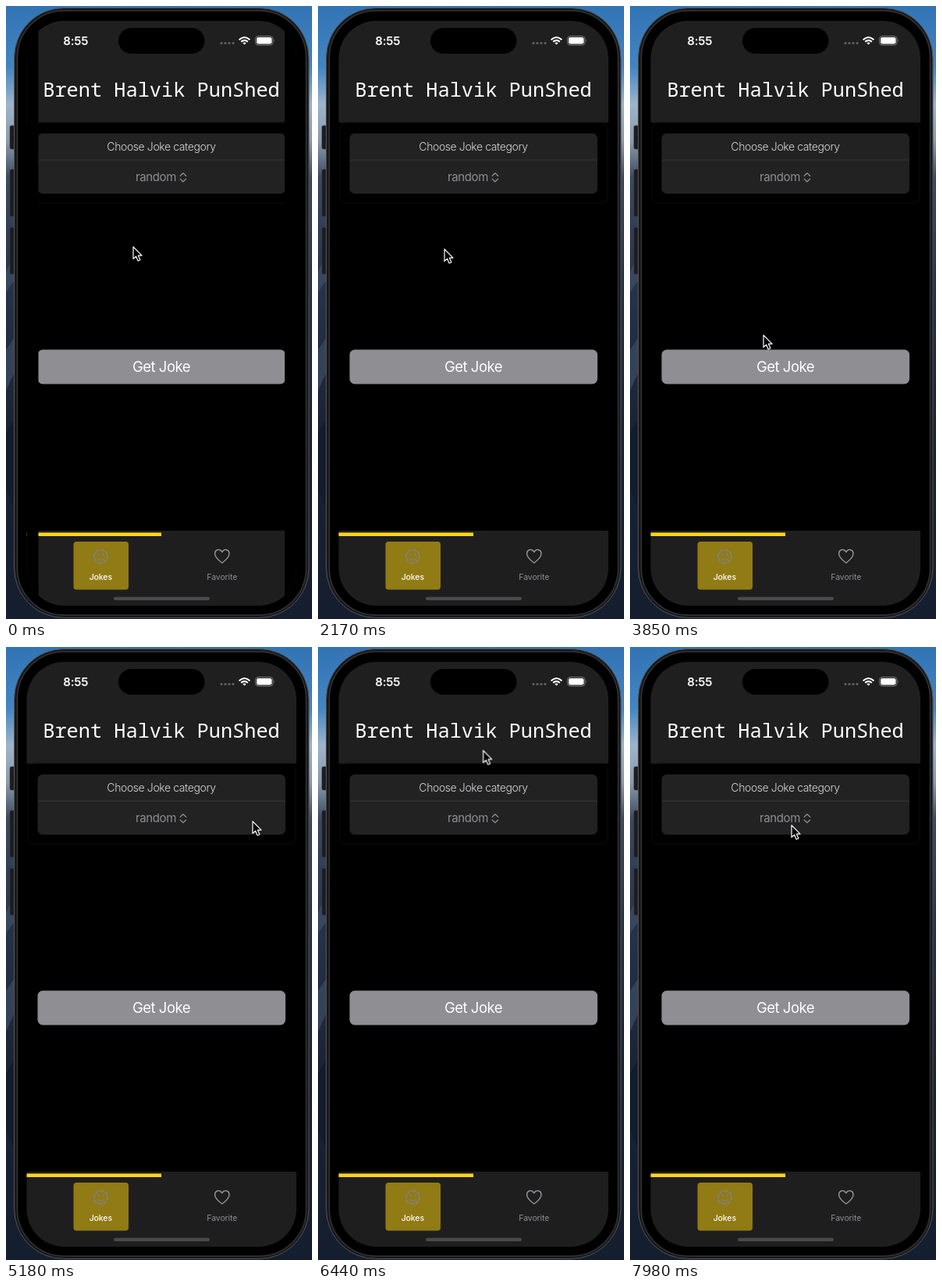
Recreate the animation shown at these times as an HTML page. Size 392 by 784 pixels, loop 8 s.

```html
<!DOCTYPE html>
<html lang="en">
<head>
<meta charset="utf-8">
<title>Joke screen</title>
<style>
  html, body { margin: 0; width: 100%; height: 100%; overflow: hidden; background: #000; }
  svg { display: block; width: 392px; height: 784px; }
  text { font-family: Inter, "Open Sans", sans-serif; text-anchor: middle; }
  .title { font: 500 25.3px "Noto Sans Mono", monospace; fill: #fff; }
  .clock { font-size: 15px; font-weight: 600; letter-spacing: -.2px; fill: #fff; }
  .label { font-size: 14px; font-weight: 300; letter-spacing: -.4px; fill: #d8d8da; }
  .choice { font-size: 15px; letter-spacing: -.4px; fill: #8e8e93; }
  .action { font-size: 18.5px; letter-spacing: -.5px; fill: #fff; }
  .tab { font-size: 10.5px; letter-spacing: -.1px; fill: #8e8e93; }
  .tab.on { font-weight: 500; fill: #fff; }
  .line { fill: none; stroke-linecap: round; stroke-linejoin: round; }

  .margins { animation: margins 8s step-end infinite; }
  @keyframes margins {
    0% { visibility: visible; }
    .875%, 100% { visibility: hidden; }
  }

  /* The pointer advances every 70 ms while it moves. */
  .pointer { animation: roam 8s step-end infinite; }
  @keyframes roam {
    0% { transform: translate(163px, 308px); }
    27.125% { transform: translate(162px, 311px); animation-timing-function: steps(8); }
    34.125% { transform: translate(166px, 366px); }
    36.75% { transform: translate(166px, 370px); animation-timing-function: steps(6); }
    42% { transform: translate(170px, 412px); }
    44.625% { transform: translate(170px, 413px); animation-timing-function: steps(4); }
    48.125% { transform: translate(171px, 421px); animation-timing-function: steps(7); }
    54.25% { transform: translate(180px, 430px); }
    55.125% { transform: translate(182px, 429px); animation-timing-function: steps(3); }
    57.75% { transform: translate(190px, 420px); }
    61.25% { transform: translate(205px, 402px); animation-timing-function: steps(4); }
    64.75% { transform: translate(316px, 223px); animation-timing-function: steps(8); }
    71.75% { transform: translate(248px, 137px); animation-timing-function: steps(11); }
    81.375% { transform: translate(208px, 132px); animation-timing-function: steps(8); }
    88.375% { transform: translate(191px, 133px); animation-timing-function: steps(13); }
    99.75%, 100% { transform: translate(207px, 228px); }
  }
</style>
</head>
<body>
<svg viewBox="0 0 392 784">
  <defs>
    <linearGradient id="sky" x2="0" y2="1">
      <stop offset="0" stop-color="#3274b4"/>
      <stop offset=".1" stop-color="#4385c2"/>
      <stop offset=".16" stop-color="#9db4ca"/>
      <stop offset=".22" stop-color="#8d9bab"/>
      <stop offset=".28" stop-color="#3c4a60"/>
      <stop offset=".45" stop-color="#26334a"/>
      <stop offset=".7" stop-color="#1a2334"/>
      <stop offset="1" stop-color="#151e2e"/>
    </linearGradient>
    <clipPath id="screen"><rect x="26.5" y="19" width="345.5" height="748" rx="48"/></clipPath>
  </defs>

  <rect width="392" height="784" fill="url(#sky)"/>
  <path d="M0 340L10 318V352L0 366ZM0 440L10 425V470L0 492Z" fill="#4b5a72" opacity=".5"/>
  <path d="M0 545L10 530V640L0 620Z" fill="#10182a" opacity=".6"/>

  <g fill="#1c1d20" stroke="#3b3c3f" stroke-width=".6">
    <rect x="5" y="153" width="8" height="30" rx="2"/>
    <rect x="5" y="209" width="8" height="60" rx="2"/>
    <rect x="5" y="283" width="8" height="60" rx="2"/>
  </g>
  <rect x="10.5" y="2.5" width="377.5" height="780" rx="64" fill="#17181a" stroke="#55565a"/>
  <rect x="14.5" y="6" width="370" height="773" rx="60" fill="#000" stroke="#343538" stroke-width="1.4"/>

  <g clip-path="url(#screen)">
    <rect x="26" y="19" width="347" height="130" fill="#1f1f20"/>
    <rect x="28" y="149" width="343" height="103" rx="8" class="line" stroke="#0d0d0d"/>
    <rect x="26" y="671" width="347" height="97" fill="#1e1e1f"/>
    <rect x="26" y="673.5" width="173" height="4.5" fill="#fbd41f"/>

    <rect x="40.5" y="163" width="317.5" height="77" rx="6.5" fill="#222223"/>
    <path d="M41 197H358" stroke="#363638"/>
    <rect x="40.5" y="439.5" width="317.5" height="44" rx="6.5" fill="#8e8e93"/>

    <g class="margins">
      <path d="M26 19H41.5V768H26ZM357 19H373V768H357Z"/>
    </g>
  </g>

  <rect x="144" y="28" width="110.5" height="33" rx="16.5"/>
  <text class="clock" x="89.3" y="49.7">8:55</text>
  <g fill="#626264">
    <circle cx="276" cy="47.5" r="1.6"/><circle cx="281" cy="47.5" r="1.6"/>
    <circle cx="286" cy="47.5" r="1.6"/><circle cx="291" cy="47.5" r="1.6"/>
  </g>
  <g class="line" stroke="#fff" stroke-width="2" style="stroke-linecap:butt">
    <path d="M298.6 43.2Q305.5 36.8 312.4 43.2M301.2 45.8Q305.5 42 309.8 45.8"/>
    <path d="M303.3 47.3Q305.5 45.7 307.7 47.3L305.5 49.5Z" fill="#fff" stroke="none"/>
  </g>
  <rect x="319.5" y="38.5" width="22.5" height="11.5" rx="3.6" class="line" stroke="#7c7c7e"/>
  <rect x="321" y="40" width="19.5" height="8.5" rx="2.3" fill="#fff"/>
  <path d="M343.3 42.3Q345 44.3 343.3 46.3Z" fill="#7c7c7e"/>

  <text class="title" x="199" y="116">Brent Halvik PunShed</text>
  <text class="label" x="199" y="185">Choose Joke category</text>
  <text class="choice" x="192" y="224.3">random</text>
  <path d="M223.2 217.3L226.9 213.8L230.6 217.3M223.2 221.2L226.9 224.7L230.6 221.2" class="line" stroke="#8e8e93" stroke-width="1.3"/>
  <text class="action" x="199" y="468.3">Get Joke</text>

  <rect x="86.5" y="685" width="70.5" height="61.5" rx="4" fill="#917b14"/>
  <g class="line" stroke="#858174" stroke-width="1.4">
    <circle cx="121.5" cy="704" r="8.3"/>
    <circle cx="121.5" cy="704" r="9.2" stroke-dasharray="2.4 4.82" stroke-width="1.2"/>
    <path d="M117.3 706.5Q121.5 711 125.7 706.5"/>
    <path d="M118.5 701.6V702.2M124.5 701.6V702.2" stroke-width="2"/>
  </g>
  <text class="tab on" x="121.3" y="733.8">Jokes</text>
  <path d="M276.8 712.3C270.5 707.8 267.6 704.3 267.6 700.6C267.6 694.6 274.4 693.7 276.8 698.5C279.2 693.7 286 694.6 286 700.6C286 704.3 283.1 707.8 276.8 712.3Z" class="line" stroke="#98989d" stroke-width="1.4"/>
  <text class="tab" x="276.8" y="733.8">Favorite</text>
  <rect x="138" y="755.7" width="123" height="4.3" rx="2.1" fill="#4b4b4d"/>

  <path class="pointer" d="M0 0V15.4L3.6 12.2L6.1 18L8.9 16.8L6.4 11.2H11Z" stroke="#fff" stroke-width="1.2" stroke-linejoin="round"/>
</svg>
</body>
</html>
```
